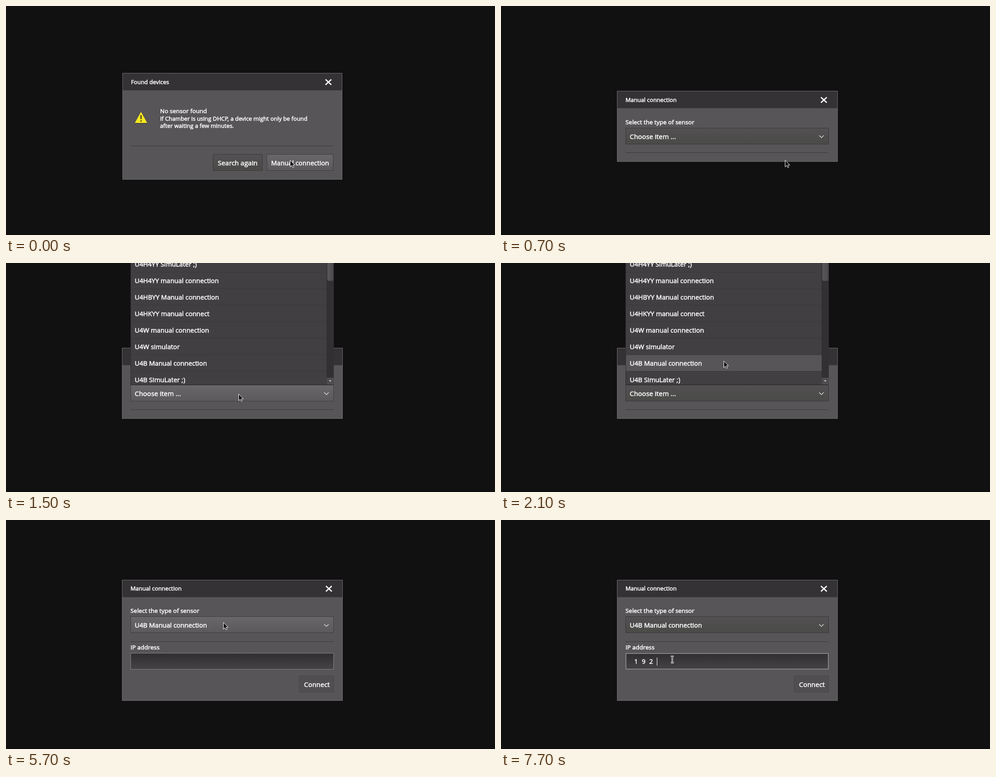
Recreate the animation shown at these times as an HTML page. Size 1092 px wide and 513 px high, loop 8000 ms.

```html
<!DOCTYPE html>
<html lang="en">
<head>
<meta charset="utf-8">
<title>Manual connection</title>
<style>
  html, body { margin: 0; width: 100%; height: 100%; overflow: hidden; background: #111; }
  svg { display: block; }
  text { font: 12.8px "Open Sans", "Noto Sans", sans-serif; fill: #fff; stroke: #fff; stroke-width: .55px; white-space: pre; }
  .label { font-size: 13.45px; }
  .item { font-size: 14.5px; }
  .wide { font-size: 14.95px; }
  .dialog { fill: #575557; stroke: #6f6d70; }
  .header { fill: #343235; }
  .rule { stroke: #39373a; }
  .button { fill: url(#idle); stroke: #383638; }
  .hover { fill: url(#lit); stroke: #3d3b3e; }
  .cross { fill: none; stroke: #fff; stroke-width: 2.7; }
  .chevron { fill: none; stroke: #eee; stroke-width: 1.2; }
  .caret { stroke: #fff; }
  [data-on] { visibility: hidden; }
</style>
</head>
<body>
<svg width="1092" height="513" viewBox="0 0 1092 513">
  <defs>
    <linearGradient id="idle" x2="0" y2="1"><stop stop-color="#535153"/><stop offset="1" stop-color="#4a4a47"/></linearGradient>
    <linearGradient id="lit" x2="0" y2="1"><stop stop-color="#69676a"/><stop offset="1" stop-color="#5b595c"/></linearGradient>
    <linearGradient id="field" x2="0" y2="1"><stop stop-color="#302e31"/><stop offset="1" stop-color="#454346"/></linearGradient>
    <linearGradient id="thumb"><stop stop-color="#5a585b"/><stop offset="1" stop-color="#4b494c"/></linearGradient>
    <path id="cross" class="cross" d="M-6.5-6 6.5 6M6.5-6-6.5 6"/>
    <path id="chevron" class="chevron" d="M-5-2.5 0 2.5 5-2.5"/>
    <path id="beam" d="M-3-6.5H-1L.5-5.5 2-6.5H4M.5-5.5V6.5M-3 7.5H-1L.5 6.5 2 7.5H4"/>
  </defs>
  <rect width="1092" height="513" fill="#111"/>
  <rect y="511" width="1092" height="2" fill="#0d0d0d"/>

  <g data-on="0 600">
    <rect class="dialog" x="260.5" y="150.5" width="490" height="238"/>
    <rect class="header" x="261" y="151" width="489" height="37"/>
    <path class="rule" d="M261 188.5H750M279 313.5H731"/>
    <text x="279" y="175">Found devices</text>
    <use href="#cross" x="720" y="170.5"/>
    <path d="M302 239 316 264H288Z" fill="#39373a" opacity=".6"/>
    <path d="M301.5 238 314.5 261.5H288.5Z" fill="#f7e81e" stroke="#f7e81e" stroke-linejoin="round"/>
    <path d="M301.5 244.5V253.5M301.5 256V259" stroke="#3a3820" stroke-width="2.6"/>
    <text class="label" x="344" y="240">No sensor found</text>
    <text x="344" y="257">If Chamber is using DHCP, a device might only be found</text>
    <text x="344" y="273">after waiting a few minutes.</text>
    <rect class="button" x="462.5" y="332.5" width="110" height="36"/>
    <text class="wide" x="473" y="357">Search again</text>
    <rect class="hover" x="582.5" y="332.5" width="148" height="36"/>
    <text class="item" x="592" y="357">Manual connection</text>
  </g>

  <g data-on="600 5000">
    <rect class="dialog" x="259.5" y="190.5" width="492" height="158"/>
    <rect class="header" x="260" y="191" width="491" height="37"/>
    <path class="rule" d="M260 228.5H751M278 328.5H732"/>
    <text x="278" y="215">Manual connection</text>
    <use href="#cross" x="721" y="210.5"/>
    <text class="label" x="278" y="265">Select the type of sensor</text>
    <rect class="button" x="278.5" y="273.5" width="453" height="36"/>
    <rect class="hover" x="278.5" y="273.5" width="453" height="36" data-on="1300 2000"/>
    <text class="wide" x="287.5" y="298">Choose item ...</text>
    <use href="#chevron" x="715.5" y="292.5"/>
  </g>

  <g data-on="1500 5000">
    <rect x="278" width="454" height="273" fill="#2f2d30"/>
    <rect x="279" width="437" height="272" fill="#413f42"/>
    <rect x="279" y="206" width="437" height="36" fill="#575557" data-on="2000 5000"/>
    <g id="list"></g>
    <rect x="716" width="16" height="273" fill="#323033"/>
    <rect x="717.5" y="-10" width="14" height="50" rx="4" fill="url(#thumb)"/>
    <rect x="716.5" y="257" width="15" height="15" fill="#504e51"/>
    <path d="M721.5 263H726.5L724 265.5Z" fill="#fff"/>
  </g>

  <g data-on="5000 8000">
    <rect class="dialog" x="259.5" y="134.5" width="492" height="270"/>
    <rect class="header" x="260" y="135" width="491" height="37"/>
    <path class="rule" d="M260 172.5H751M278 272.5H732"/>
    <text x="278" y="158">Manual connection</text>
    <use href="#cross" x="721" y="154"/>
    <text class="label" x="278" y="208">Select the type of sensor</text>
    <rect class="button" x="278.5" y="216.5" width="453" height="36"/>
    <rect class="hover" x="278.5" y="216.5" width="453" height="36" data-on="5000 5900"/>
    <text class="item" x="287.5" y="241">U4B Manual connection</text>
    <use href="#chevron" x="715.5" y="236"/>
    <text class="label" x="278" y="290">IP address</text>
    <rect x="278.5" y="298.5" width="453" height="36" fill="url(#field)" stroke="#858386"/>
    <rect x="279.5" y="299.5" width="451" height="34" fill="none" stroke="#858386" data-on="6300 8000"/>
    <rect x="654.5" y="349.5" width="77" height="36" fill="#504e50" stroke="#474547"/>
    <text class="wide" x="665.5" y="374">Connect</text>
    <text class="item" x="297.5" y="322" data-on="7200 8000">1</text>
    <text class="item" x="314.5" y="322" data-on="7400 8000">9</text>
    <text class="item" x="331" y="322" data-on="7700 8000">2</text>
    <path class="caret" d="M298.5 308V326" data-on="6400 6800"/>
    <path class="caret" d="M314.5 308V326" data-on="7200 7400"/>
    <path class="caret" d="M331.5 308V326" data-on="7400 7700"/>
    <path class="caret" d="M348.5 308V326" data-on="7700 8000"/>
  </g>

  <g id="pointer">
    <path d="M.5.5V15.5L4 12.2 6.3 17 8.8 16 6.6 11.2H11Z" fill="#151515" stroke="#fff" data-on="0 6000"/>
    <g fill="none" data-on="6000 8000">
      <use href="#beam" stroke="#fff" stroke-width="3"/>
      <use href="#beam" stroke="#151515"/>
    </g>
  </g>
</svg>
<script>
  const LOOP = 8000, TICK = 100, ROW = 37;
  const rows = ["U4H4YY SimuLater ;)", "U4H4YY manual connection", "U4HBYY Manual connection",
    "U4HKYY manual connect", "U4W manual connection", "U4W simulator",
    "U4B Manual connection", "U4B SimuLater ;)"];
  document.getElementById("list").innerHTML = rows.map((label, i) => {
    const y = ROW * i;
    const line = i < rows.length - 1 ? `<path class="rule" d="M279 ${y + 20.5}H716"/>` : "";
    return `<text class="item" x="287.5" y="${y + 8}">${label}</text>${line}`;
  }).join("");

  const moves = [
    { start: 900, end: 1400, from: [634, 345], to: [519, 293] },
    { start: 1800, end: 2100, from: [519, 293], to: [497, 219] },
    { start: 5600, end: 6100, from: [497, 219], to: [382, 312] }
  ];
  const timed = [...document.querySelectorAll("[data-on]")].map(node => {
    const [on, off] = node.dataset.on.split(" ").map(Number);
    return { node, on, off };
  });
  const pointer = document.getElementById("pointer");
  const smooth = p => p * p * (3 - 2 * p);

  // The pointer is sampled in whole ticks, like a screen recording.
  function pointerAt(time) {
    const t = Math.floor(time / TICK) * TICK;
    const move = moves.findLast(m => t >= m.start) || moves[0];
    const p = smooth(Math.min(1, Math.max(0, (t - move.start) / (move.end - move.start))));
    return move.from.map((v, i) => Math.round(v + (move.to[i] - v) * p));
  }

  const begin = performance.now();
  function draw() {
    const t = (performance.now() - begin) % LOOP;
    for (const { node, on, off } of timed) {
      node.style.visibility = t >= on && t < off ? "visible" : "hidden";
    }
    pointer.setAttribute("transform", `translate(${pointerAt(t)})`);
    requestAnimationFrame(draw);
  }
  draw();
</script>
</body>
</html>
```
